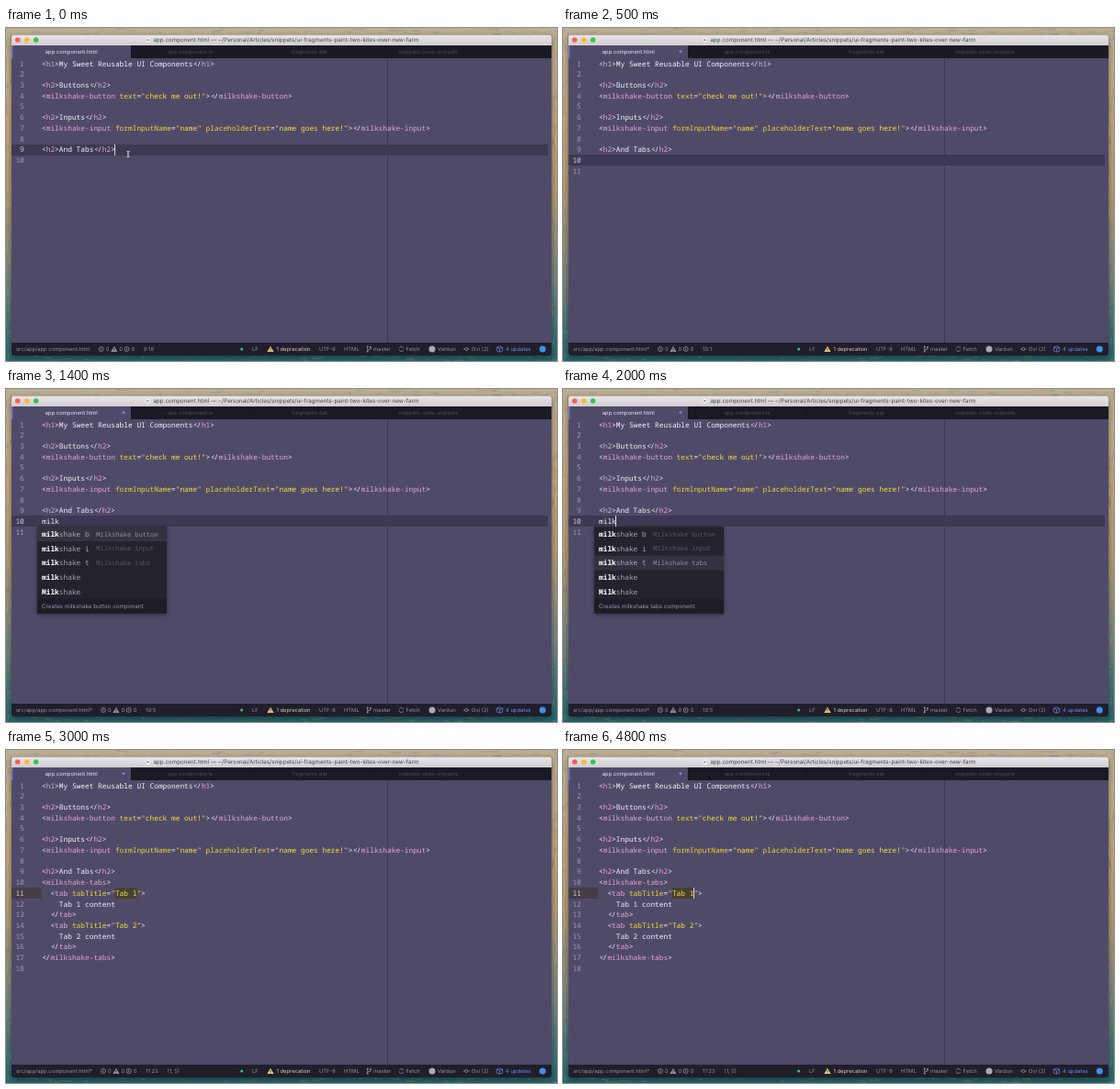
These frames come from a looping animation (600x363 px, 4.9 s). An HTML page with a canvas:

```html
<!DOCTYPE html>
<html lang="en">
<head>
<meta charset="utf-8">
<title>Editor snippets</title>
<style>
html, body { margin: 0; width: 100%; height: 100%; overflow: hidden; background: #4b5f66; }
canvas { display: block; width: 600px; height: 363px; }
</style>
</head>
<body>
<canvas id="stage"></canvas>
<script>
const W = 600, H = 363, LOOP = 4900;
const canvas = document.getElementById('stage');
const ctx = canvas.getContext('2d');
const dpr = window.devicePixelRatio || 1;
canvas.width = W * dpr;
canvas.height = H * dpr;

const UI = 'Inter, "Open Sans", sans-serif';
const MONO = '"Noto Sans Mono", "DejaVu Sans Mono", monospace';
const CH = 4.7, ROW = 11.72, LEFT = 39, FIRST = 38.8;
const PALE = '#f3f1f4', PINK = '#e5a5ca', GOLD = '#ecd334', YELLOW = '#f4e13c';
const GREY = '#918ea2';

const base = [
  '<h1>My Sweet Reusable UI Components</h1>', '',
  '<h2>Buttons</h2>',
  '<milkshake-button text="check me out!"></milkshake-button>', '',
  '<h2>Inputs</h2>',
  '<milkshake-input formInputName="name" placeholderText="name goes here!"></milkshake-input>', '',
  '<h2>And Tabs</h2>'
];
const tabItem = n => [`  <tab tabTitle="Tab ${n}">`, `    Tab ${n} content`, '  </tab>'];
const tabsBlock = ['<milkshake-tabs>', ...tabItem(1), ...tabItem(2), '</milkshake-tabs>', ''];

// Each suggestion: word, label, positions of the matched letters
const shake = (kind, hits) => ['milkshake ' + kind[0], 'Milkshake ' + kind, hits, kind];
const looseList = [
  shake('input', [0, 10]), shake('button', [0, 1]), shake('tabs', [0, 1]),
  ['mailto', 'Mail Anchor', [0, 2]], ['main', 'Main', [0, 2]], ['menuitem', 'Menu Item', [0, 4]]
];
const closeList = n => {
  const hits = [...Array(n).keys()];
  return [shake('button', hits), shake('input', hits), shake('tabs', hits),
    ['milkshake', '', hits], ['Milkshake', '', hits]];
};
const typing = (at, typed, extra) =>
  ({ at, blink: at, extra: [typed, ''], row: 10, col: typed.length + 1, ...extra });

const steps = [
  { at: 0, blink: 0, extra: [''], row: 9, col: 18 },
  typing(200, '', { blink: 0 }),
  typing(600, 'm'),
  typing(700, 'mi', { list: looseList, pick: 0 }),
  typing(900, 'mil', { list: closeList(3), pick: 0 }),
  typing(1000, 'milk', { list: closeList(4), pick: 0 }),
  typing(1600, 'milk', { blink: 1000, list: closeList(4), pick: 1 }),
  typing(1800, 'milk', { blink: 1000, list: closeList(4), pick: 2 }),
  { at: 2300, blink: 2300, extra: tabsBlock, row: 11, col: 23, selected: 5 }
];

function rect(x, y, w, h, color) {
  ctx.fillStyle = color;
  ctx.fillRect(x, y, w, h);
}

function dot(x, y, r, color) {
  ctx.fillStyle = color;
  ctx.beginPath();
  ctx.arc(x, y, r, 0, 7);
  ctx.fill();
}

function path(points, color, width) {
  ctx.beginPath();
  points.forEach(([x, y]) => ctx.lineTo(x, y));
  if (width) {
    ctx.strokeStyle = color;
    ctx.lineWidth = width;
    ctx.stroke();
  } else {
    ctx.fillStyle = color;
    ctx.fill();
  }
}

function ring(x, y, r, color, from = 0, to = 7) {
  ctx.strokeStyle = color;
  ctx.lineWidth = 0.8;
  ctx.beginPath();
  ctx.arc(x, y, r, from, to);
  ctx.stroke();
}

function label(text, x, y, color, size = 5.85, align = 'left', weight = 400) {
  ctx.font = `${weight} ${size}px ${UI}`;
  ctx.textAlign = align;
  ctx.fillStyle = color;
  ctx.fillText(text, x, y + size * 0.36);
}

function mono(text, x, y, color, size = 7.83, weight = 400) {
  const step = size * 0.6;
  ctx.font = `${weight} ${size}px ${MONO}`;
  ctx.textAlign = 'left';
  ctx.fillStyle = color;
  [...text].forEach((c, i) => {
    // pull "</" together like a ligature
    const nudge = c === '<' && text[i + 1] === '/' ? 0.6 : c === '/' && text[i - 1] === '<' ? -0.4 : 0;
    if (c !== ' ') ctx.fillText(c, x + i * step + nudge, y + size * 0.36);
  });
}

const rowY = n => FIRST + (n - 1) * ROW;

function codeLine(text, y) {
  const token = /(<\/?)([\w-]+)|("[^"]*")|(\w+)(?==)|[^<"]/g;
  for (const m of text.matchAll(token)) {
    const x = LEFT + m.index * CH;
    if (m[1]) {
      mono(m[1], x, y, PALE);
      mono(m[2], x + m[1].length * CH, y, PINK);
    } else {
      mono(m[0], x, y, m[3] ? YELLOW : m[4] ? GOLD : PALE);
    }
  }
}

function wallpaper() {
  const wash = ctx.createLinearGradient(0, 0, 0, H);
  ['#bcae92', '#c4a981', '#b39a72', '#76857f', '#22656c']
    .forEach((c, i) => wash.addColorStop(i / 4, c));
  rect(0, 0, W, H, wash);
  let seed = 7;
  const rnd = () => (seed = seed * 16807 % 2147483647) / 2147483647;
  const paints = ['#d8bd8b', '#7c929a', '#a2794a', '#566f76'];
  ctx.globalAlpha = 0.2;
  for (let i = 0; i < 420; i++) {
    const side = i % 4, along = rnd(), off = rnd() * 7, len = 2 + rnd() * 8;
    const color = paints[Math.floor(rnd() * 4)];
    if (side < 2) rect(along * W, side ? H - off : off, len, 1.2, color);
    else rect(side === 2 ? off - 1 : W - off, along * H, 1.2, len, color);
  }
  ctx.globalAlpha = 1;
}

function frameWindow() {
  ctx.save();
  ctx.shadowColor = 'rgba(0,0,0,.45)';
  ctx.shadowBlur = 6 * dpr;
  ctx.shadowOffsetY = 2 * dpr;
  ctx.fillStyle = '#504a69';
  ctx.beginPath();
  ctx.roundRect(6, 7.5, 588, 349.5, 3);
  ctx.fill();
  ctx.restore();

  const bar = ctx.createLinearGradient(0, 7.5, 0, 19);
  bar.addColorStop(0, '#e9e6e9');
  bar.addColorStop(1, '#d0cdd1');
  ctx.fillStyle = bar;
  ctx.beginPath();
  ctx.roundRect(6, 7.5, 588, 11.5, [3, 3, 0, 0]);
  ctx.fill();
  ['#f95f57', '#f8bc30', '#35c749'].forEach((c, i) => dot(12.7 + i * 10, 13, 2.8, c));
  rect(152.6, 10.5, 3.6, 5, '#f7f5f7');
  rect(153.3, 12.2, 2, 1.8, '#a87a5c');
  label('app.component.html — ~/Personal/Articles/snippets/ui-fragments-paint-two-kites-over-new-farm',
    160.5, 13, '#454246', 6.23);
}

function tabBar(t) {
  rect(6, 19, 588, 14, '#1b1924');
  rect(6, 19, 130, 14, '#504a69');
  rect(6, 19, 1.5, 14, '#716bd0');
  label('app.component.html', 71.3, 25.5, '#e9e7ef', 5.85, 'center');
  ['app.component.ts', 'fragments.dat', 'snippets.code-snippets'].forEach((name, i) => {
    rect(136 + i * 129.6, 19, 0.5, 14, '#15131c');
    label(name, 200.7 + i * 129.6, 25.5, '#4d4a5a', 5.85, 'center');
  });
  if (t >= 500) dot(128, 25.5, 1.6, '#7d7be0');
}

function warning(x, y, fill, mark) {
  path([[x, y - 3.2], [x + 3.6, y + 3], [x - 3.6, y + 3]], fill);
  rect(x - 0.4, y - 1.2, 0.8, 2.2, mark);
  rect(x - 0.4, y + 1.6, 0.8, 0.8, mark);
}

function info(x, y) {
  ring(x, y, 2.5, GREY);
  rect(x - 0.4, y - 1.3, 0.8, 2.6, GREY);
}

function statusBar(s, changed) {
  const y = 350, shift = changed ? 0 : -2.2;
  ctx.fillStyle = '#201e2b';
  ctx.beginPath();
  ctx.roundRect(6, 343, 588, 14, [0, 0, 3, 3]);
  ctx.fill();
  label('src/app/app.component.html' + (changed ? '*' : ''), 11, y, GREY);
  info(106 + shift, y);
  warning(120 + shift, y, GREY, '#201e2b');
  info(133.7 + shift, y);
  [111, 125.5, 138.8].forEach(x => label('0', x + shift, y, GREY));
  label(`${s.row}:${s.col}`, 152 + shift, y, GREY);
  if (s.selected) label(`(1, ${s.selected})`, 175.5, y, GREY);

  dot(256.7, y, 1.6, '#3fb86a');
  label('LF', 268, y, GREY);
  warning(288, y, '#e8cc80', '#3a3328');
  label('1 deprecation', 294.5, y, '#d9cfb9');
  label('UTF-8', 341, y, GREY);
  label('HTML', 368, y, GREY);

  path([[393.7, y - 2], [393.7, y + 2]], GREY, 0.8);
  path([[397, y - 1.5], [397, y], [393.7, y + 1]], GREY, 0.8);
  [[393.7, -2.5], [393.7, 2.5], [397, -2]].forEach(([x, d]) => dot(x, y + d, 1, GREY));
  label('master', 400, y, GREY);

  ring(430.5, y, 2.5, GREY, 0.4, 3);
  ring(430.5, y, 2.5, GREY, 3.6, 6);
  label('Fetch', 435.5, y, GREY);
  dot(464, y, 3.5, '#aaa7b7');
  label('Vardun', 470, y, GREY);
  ring(501.3, y, 1.6, GREY);
  path([[498, y], [499.7, y]], GREY, 0.8);
  path([[502.9, y], [504.6, y]], GREY, 0.8);
  label('Ovi (2)', 507, y, GREY);

  const blue = '#6c8ae6';
  path([[537.5, y - 3], [540.7, y - 1.8], [540.7, y + 2], [537.5, y + 3.2],
    [534.3, y + 2], [534.3, y - 1.8], [537.5, y - 3]], blue, 0.7);
  path([[534.3, y - 1.8], [537.5, y - 0.5], [540.7, y - 1.8]], blue, 0.7);
  path([[537.5, y - 0.5], [537.5, y + 3]], blue, 0.7);
  label('4 updates', 544, y, blue);
  dot(584.3, y, 3.5, '#3f8fe8');
}

function popup(s) {
  const x = 34, top = 150.3, w = 141, rh = 15.7, n = s.list.length;
  ctx.save();
  ctx.shadowColor = 'rgba(0,0,0,.5)';
  ctx.shadowBlur = 4 * dpr;
  ctx.shadowOffsetY = dpr;
  ctx.fillStyle = '#24222d';
  ctx.beginPath();
  ctx.roundRect(x, top, w, rh * (n + 1), 1);
  ctx.fill();
  ctx.restore();
  rect(x, top + n * rh, w, rh, '#1e1c27');
  s.list.forEach(([word, note, hits], i) => {
    const on = i === s.pick, y = top + (i + 0.5) * rh;
    if (on) rect(x, top + i * rh, w, rh, '#35323f');
    [...word].forEach((c, k) => {
      const hit = hits.includes(k);
      mono(c, LEFT + k * CH, y, hit ? '#ffffff' : '#a5a2b1', 7.83, hit ? 700 : 400);
    });
    mono(note, 98.3, y, on ? '#928f9e' : '#5a5767', 7);
  });
  label(`Creates milkshake ${s.list[s.pick][3]} component`, LEFT, top + (n + 0.5) * rh, '#9b98a8', 6.3);
}

function mouse(x, y) {
  const shape = [[x - 1.8, y - 3.5], [x, y - 2.8], [x, y + 2.8], [x - 1.8, y + 3.5]];
  const mirror = shape.map(([a, b]) => [2 * x - a, b]);
  for (const [color, width] of [['rgba(30,26,44,.5)', 1.8], ['#dedbe6', 0.8]]) {
    path(shape, color, width);
    path(mirror, color, width);
  }
}

function editor(s, t) {
  const top = Math.round(rowY(s.row) - ROW / 2), high = 12;
  const caret = LEFT + (s.col - 1) * CH;
  if (s.selected) {
    rect(6, top, 32.5, high, '#443e45');
    rect(caret - s.selected * CH, top, s.selected * CH, high, '#454130');
  } else {
    rect(6, top, 584, high, '#3e3953');
  }
  rect(415, 33, 1, 310, '#3d3853');
  [...base, ...s.extra].forEach((text, i) => {
    const num = String(i + 1), y = rowY(i + 1);
    mono(num, 19.8 - num.length * CH, y, i + 1 === s.row ? '#d0cdd9' : '#a09bb1');
    codeLine(text, y);
  });
  if ((t - s.blink) % 800 < 400) rect(Math.floor(caret), top, 1, high, '#dedbe4');
  if (s.list) popup(s);
  if (s.row === 9) mouse(133, 137.5);
}

function draw(t) {
  const s = steps.findLast(step => step.at <= t);
  const changed = t >= 300;
  ctx.setTransform(dpr, 0, 0, dpr, 0, 0);
  ctx.textBaseline = 'alphabetic';
  ctx.textRendering = 'geometricPrecision';
  wallpaper();
  frameWindow();
  tabBar(t);
  editor(s, t);
  statusBar(s, changed);
}

const start = performance.now();
function tick() {
  draw((performance.now() - start) % LOOP);
  requestAnimationFrame(tick);
}
tick();
</script>
</body>
</html>
```
